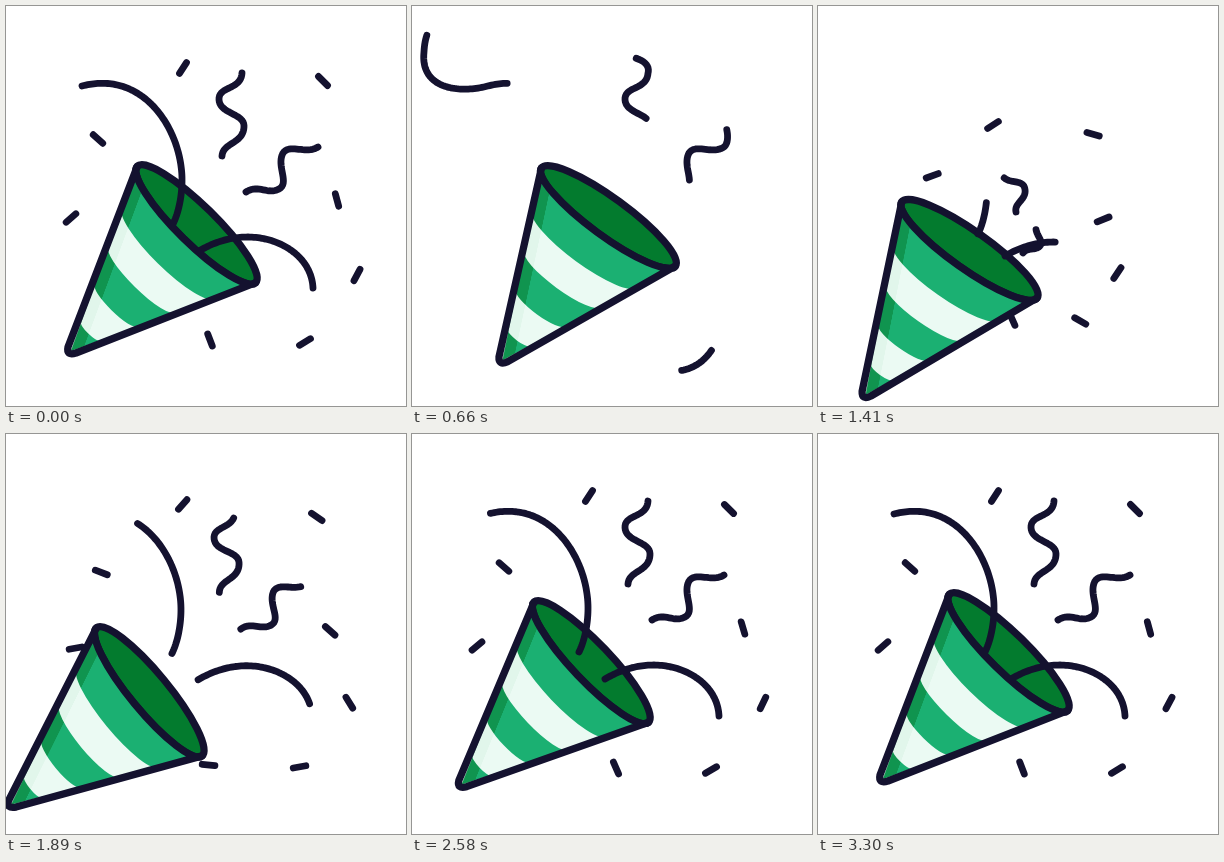
Recreate the animation shown at these times as an HTML page with a canvas. Size 400 by 400 pixels, loop 3.33 s.

```html
<!DOCTYPE html>
<html lang="en">
<head>
<meta charset="utf-8">
<title>Party popper</title>
<style>
  html, body { margin: 0; width: 100%; height: 100%; overflow: hidden; background: #fff; }
  canvas { display: block; width: 400px; height: 400px; }
</style>
</head>
<body>
<canvas id="stage" width="400" height="400"></canvas>
<script>
const ctx = document.getElementById('stage').getContext('2d');
const LOOP = 3330, STEP = 30;
const RECOIL = 1190, BURST = 1240, SETTLE = 1410, REST = 3300;
const INK = '#14122f', INSIDE = '#037b2e';
const GREEN = ['#10944f', '#1bb072'], WHITE = ['#e1f6eb', '#ebfaf3'];
const TIP = { x: 65, y: 345 }, PIVOT = { x: 142, y: 174 }, NOZZLE = { x: 170, y: 262 };
const RIM = [190.5, 218.5, 83, 19, 44.5 * Math.PI / 180];
const rad = deg => deg * Math.PI / 180;

// Confetti at rest: x, y, angle, and the turn it still has to make when settling
const CONFETTI = [
  [177, 62, -57, 24], [92, 133, 42, -62], [65, 212, -41, 90], [317, 75, 45, -29],
  [331, 194, 75, -97], [351, 269, -62, -174], [299, 336, -31, 61], [204, 334, 69, -183]
];

// Ribbons: resting curve, the stretch they leave along, and how they enter
const RIBBONS = [
  { rest: 'M167 218C174 204 178 180 175 160C169 115 133 65 76 80',
    exit: 'C45 88 8 82 12 46C13 22 24 12 33 12C44 13 47 27 43 41',
    shift: [-7, 10], shrink: 0, tilt: 0, hidden: .84, ease: slow, span: 1178, lag: 1.2 },
  { rest: 'M193 245C222 228 250 228 272 237C293 246 306 262 307 282',
    exit: 'C310 310 308 330 301 342C290 360 272 368 253 364',
    shift: [-6, 5], shrink: 0, tilt: 0, hidden: .63, ease: fast, span: 800, lag: 1.2 },
  { rest: 'M216 150C217 136 238 138 238 120C238 107 213 108 213 93C213 80 235 84 236 67',
    exit: 'C238 60 232 55 226 53C221 51 218 49 214 46',
    shift: [-18, 56], shrink: .3, tilt: -.3, hidden: .37, ease: fast, span: 1160, lag: 2 },
  { rest: 'M240 186C252 178 262 189 273 183C284 177 270 160 277 147C284 137 300 149 312 141',
    exit: 'C316 138 316 130 315 125C314 119 313 118 311 114',
    shift: [-35, 61], shrink: .45, tilt: -.3, hidden: .39, ease: fast, span: 1160, lag: 2 }
];

function svgPath(d) {
  const p = document.createElementNS('http://www.w3.org/2000/svg', 'path');
  p.setAttribute('d', d);
  return p;
}

for (const r of RIBBONS) {
  r.path = svgPath(r.rest + r.exit);
  r.total = r.path.getTotalLength();
  r.length = svgPath(r.rest).getTotalLength();
}

const clamp = u => Math.min(1, Math.max(0, u));
const easeInOut = u => u * u * (3 - 2 * u);
const easeOut = u => 1 - (1 - u) ** 2;
const relax = u => (1 - u) ** 3 * (1 + 3 * u);

// What is left to travel after the burst: 1 at SETTLE, 0 at the end
function remaining(t, end, power) {
  return t < SETTLE
    ? 1 + 2.5 * ((SETTLE - t) / (SETTLE - BURST)) ** 1.5
    : Math.max(0, (end - t) / (end - SETTLE)) ** power;
}
function fast(t) { return remaining(t, 2700, 4.1); }
function slow(t) { return remaining(t, 2900, 2.75); }

function coneAngle(t) {
  const peak = 1860;
  if (t < RECOIL) return -14.3 * easeInOut(t / RECOIL);
  if (t < peak) return -14.3 + 20.3 * easeInOut((t - RECOIL) / (peak - RECOIL));
  return 6 * relax(clamp((t - peak) / (REST - peak)));
}

function kick(t, peak) {
  return t < peak
    ? easeOut(clamp((t - RECOIL) / (peak - RECOIL)))
    : relax(clamp((t - peak) / (REST - peak)));
}

function inCone(t, draw) {
  ctx.save();
  ctx.translate(PIVOT.x - 52 * kick(t, 1530), PIVOT.y + 41 * kick(t, 1570));
  ctx.rotate(rad(coneAngle(t)));
  ctx.translate(-PIVOT.x, -PIVOT.y);
  ctx.lineWidth = 7.3;
  draw();
  ctx.restore();
}

function drawInside() {
  ctx.beginPath();
  ctx.ellipse(...RIM, 0, Math.PI * 2);
  ctx.fillStyle = INSIDE;
  ctx.fill();
  ctx.stroke();
}

// Hard-edged shade along the left side
function shaded([dark, light]) {
  const g = ctx.createLinearGradient(96, 250, 110, 255.2);
  g.addColorStop(0, dark);
  g.addColorStop(.97, dark);
  g.addColorStop(1, light);
  return g;
}

function fillBody(scale, colors) {
  ctx.save();
  ctx.translate(TIP.x, TIP.y);
  ctx.scale(scale, scale);
  ctx.translate(-TIP.x, -TIP.y);
  ctx.beginPath();
  ctx.ellipse(...RIM, 0, Math.PI);
  ctx.lineTo(TIP.x, TIP.y);
  ctx.closePath();
  ctx.restore();
  ctx.fillStyle = shaded(colors);
  ctx.fill();
}

function drawBody() {
  fillBody(1, GREEN);
  for (let i = 0; i < 4; i++) fillBody(.775 - .207 * i, i % 2 ? GREEN : WHITE);
  ctx.beginPath();
  ctx.ellipse(...RIM, 0, Math.PI);
  ctx.lineTo(62, 341);
  ctx.quadraticCurveTo(60, 350, 70, 347);
  ctx.closePath();
  ctx.stroke();
}

function drawDash(x, y, deg) {
  const dx = Math.cos(rad(deg)) * 6.4, dy = Math.sin(rad(deg)) * 6.4;
  ctx.beginPath();
  ctx.moveTo(x - dx, y - dy);
  ctx.lineTo(x + dx, y + dy);
  ctx.stroke();
}

// How far a ray from the nozzle must stretch to leave the stage
function exitFactor(dx, dy) {
  const edge = 11;
  const reach = (from, d) => ((d > 0 ? 400 + edge : -edge) - from) / d;
  return Math.min(reach(NOZZLE.x, dx), reach(NOZZLE.y, dy));
}

function drawConfetti(t) {
  for (const [x, y, angle, turn] of CONFETTI) {
    const dx = x - NOZZLE.x, dy = y - NOZZLE.y;
    let k, spin;
    if (t < BURST) {
      const q = (t / 660) ** 1.5;
      k = 1 + (exitFactor(dx, dy) - 1) * q;
      spin = -.3 * q;
    } else {
      k = 1 - .285 * fast(t);
      spin = Math.min(slow(t), 1.6);
    }
    drawDash(NOZZLE.x + dx * k, NOZZLE.y + dy * k, angle + turn * spin);
  }
}

function drawRibbon(r, t) {
  let from = 0, to, f = 0;
  if (t < BURST) {
    const u = clamp(t / r.span);
    from = r.total * u ** r.lag;
    to = r.length + (r.total - r.length) * u ** .8;
  } else {
    f = Math.min(fast(t), 2);
    to = r.length * (1 - r.hidden * r.ease(t));
  }
  if (to - from < .5) return;

  const base = r.path.getPointAtLength(0);
  const scale = 1 - r.shrink * f, tilt = r.tilt * Math.min(f, 1);
  const c = Math.cos(tilt) * scale, s = Math.sin(tilt) * scale;
  const count = Math.ceil((to - from) / 2);
  ctx.beginPath();
  for (let i = 0; i <= count; i++) {
    const p = r.path.getPointAtLength(from + (to - from) * i / count);
    const x = p.x - base.x, y = p.y - base.y;
    ctx.lineTo(base.x + r.shift[0] * f + x * c - y * s, base.y + r.shift[1] * f + x * s + y * c);
  }
  ctx.stroke();
}

function render(t) {
  ctx.fillStyle = '#fff';
  ctx.fillRect(0, 0, 400, 400);
  ctx.strokeStyle = INK;
  ctx.lineCap = ctx.lineJoin = 'round';
  inCone(t, drawInside);
  ctx.lineWidth = 6.8;
  drawConfetti(t);
  for (const r of RIBBONS) drawRibbon(r, t);
  inCone(t, drawBody);
}

const start = performance.now();
function tick() {
  const t = (performance.now() - start) % LOOP;
  render(Math.floor(t / STEP) * STEP);
  requestAnimationFrame(tick);
}
tick();
</script>
</body>
</html>
```
